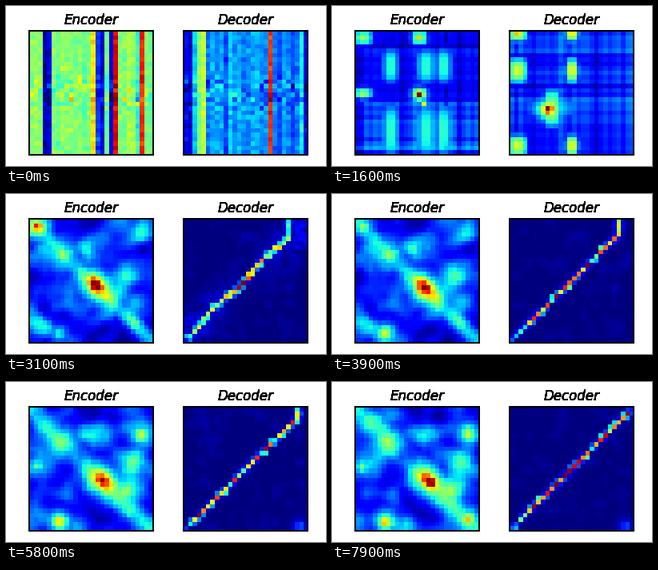
Write a matplotlib script that moves like this. It is 400x200 px and loops after 8000 ms.

```python
import numpy as np
import matplotlib.pyplot as plt
from matplotlib.animation import FuncAnimation

N = 28
FRAMES = 80
Y, X = np.mgrid[0:N, 0:N].astype(float)
COLS = np.arange(N)


def ramp(t, start, end):
    u = np.clip((t - start) / (end - start), 0, 1)
    return u * u * (3 - 2 * u)


def mix(a, b, w):
    return (1 - w) * a + w * b


def soft_max(*parts):
    return sum(np.maximum(p, 0) ** 4 for p in parts) ** 0.25


def noise(seed, width=0.0, angle=0.0):
    """Unit random field, smoothed over `width` cells, drifting with `angle`."""
    a, b = np.random.default_rng(seed).normal(size=(2, N, N))
    field = np.cos(angle) * a + np.sin(angle) * b
    if width:
        kernel = np.exp(-((X - Y) / width) ** 2)
        field = kernel @ field @ kernel.T
    return (field - field.mean()) / field.std()


def weave(seed, amount):
    """Row and column stripes around 1."""
    rng = np.random.default_rng(seed)
    lines = rng.normal(size=(N, 1)) + rng.normal(size=(1, N))
    return np.clip(1 + amount * lines, 0.2, 1.8)


def bands(seed, base, marks):
    """Vertical stripes; `marks` sets the columns that stand out."""
    rng = np.random.default_rng(seed)
    level = base + 0.04 * rng.normal(size=N)
    for col, value in marks.items():
        level[col] = value
    grain = 0.025 + 0.04 * np.exp(-((Y - 14) / 4) ** 4)
    return level + grain * noise(seed + 1)


def peak(x, y, height, radius, stretch=1.0):
    """Pointed spot, stretched along the falling diagonal."""
    along, across = (X - x + Y - y) / 2 ** 0.5, (X - x - Y + y) / 2 ** 0.5
    return height * np.exp(-np.hypot(along / stretch, across) / radius)


def blocks(cols, rows, level, tip):
    """Soft rectangles where column and row groups cross, with hot centres."""
    parts = []
    for x, rx in cols:
        for y, ry in rows:
            d = ((X - x) / rx) ** 4 + ((Y - y) / ry) ** 4
            parts += [level * np.exp(-d), peak(x, y, tip, 1.2)]
    return soft_max(*parts)


encoder_start = bands(1, 0.47, {
    3: .03, 4: .08, 14: .63, 15: .18, 16: .08, 18: .08, 19: .86, 25: .82})
encoder_blocks = soft_max(
    (0.1 + 0.07 * (Y > 15)) * weave(2, 0.25),
    blocks([(1.3, 2.2), (14, 2)], [(1, 1.6), (13.7, 1.2)], .45, .65),
    blocks([(7.5, 1.8), (15.5, 2), (19.5, 1.8)], [(7.5, 4), (22, 6)], .39, .3),
    peak(14, 14, 1, 1.2), peak(15, 16, .6, 1))

decoder_start = bands(11, 0.27, {
    0: .12, 1: .06, 2: .33, 3: .50, 4: .58, 19: .86, 26: .37, 27: .10})
decoder_blocks = soft_max(
    0.13 * weave(12, 0.25),
    blocks([(1.3, 2.2), (13.5, 1.4)], [(0, 2), (8.5, 3), (25.5, 2.6)], .44, .7),
    blocks([(9, 2)], [(17, 4.5)], .4, .5),
    blocks([(9, 6)], [(17, 1.8)], .25, 0), peak(8, 17.3, 1, 1.6))

# x, y, height, radius, frame of appearance
SPOTS = [(6.3, 25.5, .85, 2.0, 30), (25, 5.6, .70, 2.5, 45),
         (25, 25, .70, 2.3, 62), (21.4, 18.5, .62, 3.0, 48),
         (7, 7.5, .58, 3.5, 20), (1, 13, .50, 2.6, 50)]


def encoder_late(t):
    """Broad falling ridge with a hot core and growing side spots."""
    width = mix(2.8, 4.5, ramp(t, 24, 75))
    cloud = noise(3, 2.2, 0.03 * (t - 24))
    ground = 0.17 + 0.09 * cloud
    ridge = 0.4 * np.exp(-((X - Y) / width) ** 2) * (1 + 0.15 * cloud)
    shift = mix(14.3, 16.2, ramp(t, 22, 55))
    core = peak(shift, shift, 1.25, 2.1, 1.6)
    corner = peak(1.3, 1.3, 1.15 * (1 - ramp(t, 24, 55)), 2.2)
    spots = [peak(x, y, h * ramp(t, born - 8, born + 8), r)
             for x, y, h, r, born in SPOTS]
    field = soft_max(ground, ridge, core, corner, *spots)
    return field * (1 + 0.05 * noise(4, 0.8, 0.1 * t))


def decoder_late(t):
    """Rising line that straightens, narrows and heats up."""
    settle = ramp(t, 22, 38)
    wobble = -1.3 * (1 + np.cos(2 * np.pi * (COLS - 7) / 10)) * (1 - settle)
    jitter = 0.2 * noise(13, 0, 0.12 * t)[0]
    path = N - 1 - COLS + wobble + jitter
    glow = 0.38 + 0.62 * np.exp(-((COLS - 13.5) / 1.8) ** 2)
    heat = np.clip(0.72 + 0.15 * noise(14, 0, 0.15 * t)[0]
                   + 0.1 * ramp(t, 55, 79), 0.4, 1)
    heat = heat * np.clip(0.35 + COLS / 5, 0, 1)
    tail = np.interp(t, [24, 39, 58, 79], [22, 24, 25.2, 26.2])
    level = mix(glow, heat, settle) * np.clip(tail + 1 - COLS, 0, 1)
    width = mix(1.1, 0.72, settle)
    line = level * np.exp(-((Y - path) / width) ** 2)
    end = 0.65 * np.exp(-((X - tail) / 0.7) ** 2
                        - ((Y - 1) / mix(2.4, 0.9, ramp(t, 36, 75))) ** 2)
    haze = (0.2 * np.exp(-((X + Y - 27) / 6) ** 2) * np.abs(X - 13.5) / 13
            * (1 - settle) * (1 + 0.5 * noise(15, 0.8)))
    specks = 0.012 * np.maximum(noise(16, 1, 0.1 * t), 0)
    dot = peak(25.6, 26.5, 0.4 * ramp(t, 45, 56), 0.8)
    return soft_max(line, end * settle, haze, specks, dot)


def grow(t, start, middle, late):
    field = mix(start, middle, ramp(t, 2, 13))
    field = mix(field, late(t), ramp(t, 16, 25))
    return np.clip(field / min(field.max(), 1), 0, 1)


fig = plt.figure(figsize=(4, 2), dpi=100, facecolor="white")


def panel(left, title):
    ax = fig.add_axes([left / 400, 14 / 200, 155 / 400, 155 / 200])
    ax.set_xticks([])
    ax.set_yticks([])
    for spine in ax.spines.values():
        spine.set_linewidth(1.44)
    # stacked copies give the heavy edges of the lettering
    for _ in range(16):
        ax.annotate(title, (0.5, 1), xycoords="axes fraction", xytext=(0, 6),
                    textcoords="offset points", ha="center", va="baseline",
                    family="DejaVu Sans", style="italic", fontsize=12)
    return ax.imshow(np.zeros((N, N)), cmap="jet", vmin=0, vmax=1,
                     interpolation="nearest", aspect="auto")


encoder = panel(29, "Encoder")
decoder = panel(222, "Decoder")


def update(t):
    encoder.set_data(grow(t, encoder_start, encoder_blocks, encoder_late))
    decoder.set_data(grow(t, decoder_start, decoder_blocks, decoder_late))
    return encoder, decoder


anim = FuncAnimation(fig, update, frames=FRAMES, interval=100, repeat=True,
                     repeat_delay=0, blit=False)
plt.show()
```
